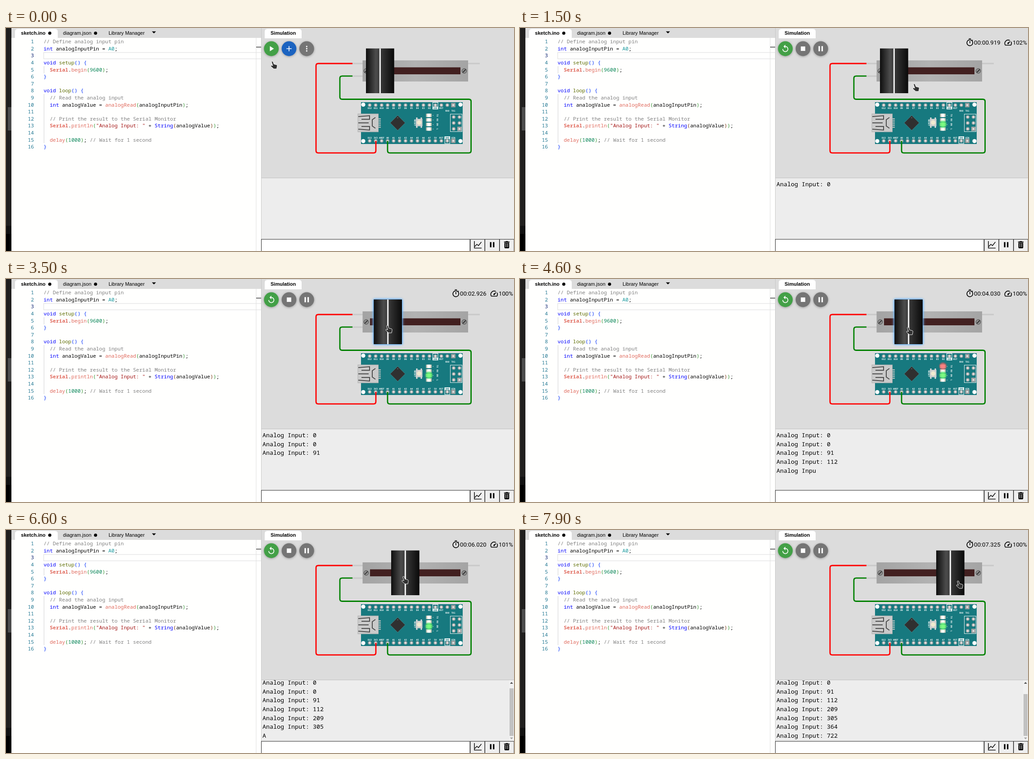
These frames come from a looping animation (1129 by 496 pixels, 8 s). An HTML page:

```html
<!DOCTYPE html>
<html lang="en">
<head>
<meta charset="utf-8">
<title>Slider simulation</title>
<style>
html, body { margin: 0; width: 100%; height: 100%; overflow: hidden; background: #dcdcdc; }
svg { display: block; }
text { white-space: pre; }
.tab { font: 11px "Liberation Sans", Arial, sans-serif; }
.code { font: 11.433px "Noto Sans Mono", monospace; }
.serial { font: 13.33px "Noto Sans Mono", monospace; }
.clock { font: 13.2px Roboto, sans-serif; }
.tip { font: 500 9.35px Roboto, sans-serif; fill: #fff; text-anchor: middle; }
.pin { font: bold 4.9px "DejaVu Sans Mono", monospace; fill: #fff; text-anchor: middle; }
.b { font-weight: bold; }
.c { fill: #808080; } .k { fill: #00f; } .f { fill: #5e6d03; } .a { fill: #e0695c; }
.s { fill: #a31515; } .n { fill: #098658; } .t { fill: #1a9a9f; }
.p1 { fill: #0431fa; } .p2 { fill: #319331; } .p3 { fill: #7b3814; }
.glow { filter: drop-shadow(0 0 2.5px #4fa8ff) drop-shadow(0 0 2px #8ccaff); }
.raised { filter: drop-shadow(0 1.5px 2.5px rgba(0, 0, 0, .32)); }
</style>
</head>
<body>
<svg id="stage" width="1129" height="496" viewBox="0 0 1129 496">
  <defs>
    <linearGradient id="knobFill">
      <stop offset="0" stop-color="#0e0e0e"/><stop offset=".35" stop-color="#4c4c4c"/>
      <stop offset=".5" stop-color="#3a3a3a"/><stop offset="1" stop-color="#0a0a0a"/>
    </linearGradient>
    <linearGradient id="bodyFill">
      <stop offset="0" stop-color="#a3a3a3"/><stop offset=".5" stop-color="#b2b2b2"/>
      <stop offset="1" stop-color="#a4a4a4"/>
    </linearGradient>
    <radialGradient id="greenLight">
      <stop offset="0" stop-color="#80ff80"/><stop offset=".55" stop-color="#60f070" stop-opacity=".85"/>
      <stop offset="1" stop-color="#40e060" stop-opacity="0"/>
    </radialGradient>
    <radialGradient id="redLight">
      <stop offset="0" stop-color="#ff8080"/><stop offset=".55" stop-color="#f06a6a" stop-opacity=".8"/>
      <stop offset="1" stop-color="#e04040" stop-opacity="0"/>
    </radialGradient>
    <clipPath id="serialClip"><rect x="568" y="334" width="550" height="136"/></clipPath>
  </defs>
</svg>
<script>
const stage = document.getElementById('stage');
const $ = id => document.getElementById(id);
const rect = (x, y, w, h, fill, more = '') =>
  `<rect x="${x}" y="${y}" width="${w}" height="${h}" fill="${fill}" ${more}/>`;
const circle = (x, y, r, fill, more = '') => `<circle cx="${x}" cy="${y}" r="${r}" fill="${fill}" ${more}/>`;
const line = (d, color, width, more = '') =>
  `<path d="${d}" fill="none" stroke="${color}" stroke-width="${width}" ${more}/>`;
const shape = (d, fill) => `<path d="${d}" fill="${fill}"/>`;
const text = (x, y, cls, s, more = '') => `<text x="${x}" y="${y}" class="${cls}" ${more}>${s}</text>`;
const group = (id, body) => `<g id="${id}">${body}</g>`;
const icon = (d, x, y, fill, k = .82) =>
  `<path transform="translate(${x} ${y}) scale(${k}) translate(-12 -12)" d="${d}" fill="${fill}"/>`;

const ICON = {
  play: 'M8 5v14l11-7z',
  add: 'M19 13h-6v6h-2v-6H5v-2h6V5h2v6h6z',
  more: 'M12 8a2 2 0 1 0 0-4 2 2 0 0 0 0 4zm0 2a2 2 0 1 0 0 4 2 2 0 0 0 0-4zm0 6a2 2 0 1 0 0 4 2 2 0 0 0 0-4z',
  replay: 'M12 5V1L7 6l5 5V7c3.31 0 6 2.69 6 6s-2.69 6-6 6-6-2.69-6-6H4c0 4.42 3.58 8 8 8s8-3.58 8-8-3.58-8-8-8z',
  stop: 'M6 6h12v12H6z',
  pause: 'M6 19h4V5H6zm8-14v14h4V5z',
  trash: 'M6 19a2 2 0 0 0 2 2h8a2 2 0 0 0 2-2V7H6zM19 4h-3.5l-1-1h-5l-1 1H5v2h14z',
  timer: 'M15 1H9v2h6zM11 14h2V8h-2zM19 7.4l1.4-1.4-1.4-1.4-1.4 1.4A9 9 0 1 0 19 7.4zM12 20a7 7 0 1 1 0-14 7 7 0 0 1 0 14z',
  speed: 'M20.4 8.6l-1.2 1.8a8 8 0 0 1-.3 7.6H5.1A8 8 0 0 1 15.6 6.9l1.8-1.3A10 10 0 0 0 3.4 19a2 2 0 0 0 1.7 1h13.8a2 2 0 0 0 1.8-1 10 10 0 0 0-.3-10.4zM10.6 15.4a2 2 0 0 0 2.8 0l5.7-8.5-8.5 5.7a2 2 0 0 0 0 2.8z'
};

// Each token is "class:text"; tokens are split by "|".
const CODE = [
  'c:// Define analog input pin',
  'k:int|: analogInputPin = |t:A0|:;',
  '',
  'k:void|: |f:setup|p1:()|: |p1:{',
  ':  |a b:Serial|:.|a:begin|p2:(|n:9600|p2:)|:;',
  'p1:}',
  '',
  'k:void|: |f:loop|p1:()|: |p1:{',
  'c:  // Read the analog input',
  'k:  int|: analogValue = |a:analogRead|p2:(|:analogInputPin|p2:)|:;',
  '',
  'c:  // Print the result to the Serial Monitor',
  'a b:  Serial|:.|a:println|p2:(|s:"Analog Input: "|: + |k:String|p3:(|:analogValue|p3:)|p2:)|:;',
  '',
  'a:  delay|p2:(|n:1000|p2:)|:; |c:// Wait for 1 second',
  'p1:}'
];

function codeLine(src, i) {
  const y = 34.2 + i * 15.6;
  const spans = src && src.split('|').map(tok => {
    const at = tok.indexOf(':');
    return `<tspan class="${tok.slice(0, at)}">${tok.slice(at + 1)}</tspan>`;
  }).join('');
  return text(62.2, y, 'code', i + 1, `text-anchor="end" fill="${i === 2 ? '#0b216f' : '#237893'}"`) +
    text(83.5, y, 'code', spans, 'xml:space="preserve"');
}

function editor() {
  return rect(0, 0, 12, 440, '#201f1e') + rect(4, 176, 8, 52, '#4c4c4c') +
    rect(0, 440, 12, 18, '#111') + rect(0, 458, 12, 38, '#000') +
    rect(12, 22, 555, 474, '#fffffe') +
    shape('M20 23V8q0-6 6-6H109q6 0 6 6V23z', '#fff') +
    text(33.3, 15, 'tab b', 'sketch.ino') + circle(97.3, 11.5, 3.5, '#000') +
    text(126.8, 15, 'tab', 'diagram.json') + circle(199, 11.5, 3.5, '#000') +
    text(228, 15, 'tab', 'Library Manager') + shape('M324.2 7.5h9.2l-4.6 4.6z', '#000') +
    line('M83.5 54.5H567M83.5 68.5H567M83.7 54V69', '#e6e6e6', 1.5) +
    line('M84.5 85V101M84.5 147V256', '#d3d3d3', 1) +
    line('M556 22V496', '#dedede', 1) + line('M556 42.5H567', '#424242', 1.6) +
    line('M567.5 0V496', '#c8c8c8', 1) + CODE.map(codeLine).join('');
}

function slider() {
  const screw = x => circle(x, 95.5, 5.3, '#8d8d8d', 'stroke="#444" stroke-width="1"') +
    line(`M${x - 3.5} 99L${x + 3.5} 92`, '#222', 1.6);
  return line('M769 79H793M769 107H793M1027 79H1053', '#c9c9c9', 3) +
    rect(792.5, 72, 234.5, 47, 'url(#bodyFill)') + rect(809, 87.5, 201, 15.5, '#422020') +
    screw(800.5) + screw(1018.5) +
    group('knob', rect(800, 45.5, 62.7, 99.5, 'url(#knobFill)') + rect(829.8, 45.5, 3.2, 99.5, '#ececec'));
}

function board() {
  const TEAL = '#17797f', px = i => 808.3 + i * 13.27;
  const pad = (x, y) => circle(x, y, 3.8, '#b9b9b9') + circle(x, y, 2, '#e6e6e6') +
    circle(x, y, 3, 'none', 'stroke="#8c8c8c" stroke-width=".7"');
  const ground = (x, y, labelY) => rect(x - 5.7, y - 6, 11.4, 12, 'none', 'stroke="#fff"') +
    rect(x - 6.2, labelY - 5, 12.4, 6, '#fff');
  const row = (names, y, labelY) => names.split(' ').map((name, i) => {
    const x = px(i), gnd = name === 'GND', low = /RX0|TX1/.test(name);
    return (gnd ? ground(x, y, labelY) : '') +
      (i === 14 ? rect(x - 4.8, y - 4.8, 9.6, 9.6, '#9b9b9b') : '') + pad(x, y) +
      text(x, labelY + (low ? 6 : 0), 'pin', name, gnd ? `style="fill:${TEAL}"` : '');
  }).join('');
  let s = rect(789, 165, 226, 93, TEAL);
  for (const x of [794, 1010]) for (const y of [170.5, 251.5]) s += circle(x, y, 4.6, '#fff');
  s += row('D12 D11 D10 D9 D8 D7 D6 D5 D4 D3 D2 GND RST RX0 TX1', 171.5, 180);
  s += row('D13 3V3 AREF A0 A1 A2 A3 A4 A5 A6 A7 5V RST GND VIN', 251, 246);
  // USB socket
  for (let i = 0; i < 5; i++) s += rect(827, 201 + i * 4.6, 6, 2.4, '#b8c0c0');
  s += rect(782, 191, 45.5, 40, '#cacaca', 'stroke="#b0b0b0" stroke-width="1"') +
    line('M783 197L808 195V203H790M783 211H806M790 219H808V227L783 225M821 199L814 204V218L821 223', '#4c4c4c', 2);
  // Processor
  s += '<g transform="translate(870.5 211) rotate(45)">' +
    rect(-11.7, -11.7, 23.4, 23.4, 'none', 'stroke="#75898a" stroke-width="1" stroke-dasharray="1 1"') +
    rect(-11.5, -11.5, 23, 23, '#303030') + circle(-8, -8, 1.2, '#666') + '</g>';
  // Reset button
  s += rect(911.5, 199, 3, 23, '#dedede') + rect(921.5, 199, 3, 23, '#dedede') +
    rect(911, 202, 14.5, 16.5, '#cfcfcf') + circle(918.2, 210.3, 5, '#f0ead0') +
    text(0, 0, 'pin', 'RESET', 'transform="translate(906.5 210.5) rotate(90)"');
  ['TX', 'RX', 'ON', 'L'].forEach((name, i) => {
    const y = 194.3 + i * 10.1;
    s += rect(933.5, y - 3.8, 12.5, 7.6, '#c9c9b8') + rect(936.3, y - 3.8, 7, 7.6, '#fff') +
      rect(948.5, y - .5, 1.3, 1.3, '#cfe3e4') +
      text(0, 0, 'pin', name, `transform="translate(956.5 ${y}) rotate(90)"`);
  });
  s += rect(987.5, 191.5, 26, 39, 'none', 'stroke="#e8f0f0" stroke-width="1"');
  for (let i = 0; i < 6; i++) {
    const x = 995 + i % 2 * 12.8, y = 198 + (i >> 1) * 13.2;
    if (i === 5) s += rect(x - 4.8, y - 4.8, 9.6, 9.6, '#a5a5a5');
    s += pad(x, y);
  }
  return s + group('power', circle(940, 214, 10, 'url(#greenLight)')) +
    group('tx', circle(940, 194, 10, 'url(#redLight)'));
}

function wires() {
  return line('M770 79H694q-5 0-5 5V272.8q0 5 5 5H817q5 0 5-5V251', '#f00', 2.8) +
    line('M770 106.8H747q-5 0-5 5V153.5q0 5 5 5H1028.6q5 0 5 5V272.8q0 5-5 5H853q-5 0-5-5V251', '#008000', 2.8);
}

function serialPanel() {
  const key = x => rect(x, 470, 32, 27, '#efefef', 'stroke="#222" stroke-width="1"');
  const rows = Array.from({ length: 8 }, (_, i) => text(570, 352 + i * ROW, 'serial', '', `id="row${i}"`)).join('');
  return rect(568, 334, 561, 162, '#ededed') + line('M568 333.5H1129', '#c0c0c0', 1) +
    `<g clip-path="url(#serialClip)">${group('rows', rows)}</g>` +
    group('scrollbar', rect(1118, 334, 11, 136, '#f1f1f1') + rect(1119, 346, 9, 112, '#c1c1c1', 'id="thumb"') +
      shape('M1120 342h7l-3.5-4z', '#505050') + shape('M1120 461.5h7l-3.5 4z', '#a3a3a3')) +
    rect(567.5, 470, 463.5, 27, '#fff', 'stroke="#222" stroke-width="1"') +
    key(1032) + key(1064.5) + key(1097) +
    line('M1041 474V489.5H1057M1042 486L1046.5 481L1050 484L1056.5 476', '#111', 1.6) +
    icon(ICON.pause, 1080.5, 482, '#000') + icon(ICON.trash, 1113, 482, '#000', .88) +
    line('M1111 479V487.5M1115 479V487.5', '#efefef', 1.2);
}

function toolbar() {
  const disc = (x, fill, id = '') => circle(x, 46, 16.4, fill, `class="raised" ${id}`);
  const button = (x, fill, name) => disc(x, fill) + icon(ICON[name], x, 46, '#fff');
  return shape('M575 23V8q0-6 6-6H651q6 0 6 6V23z', '#fff') +
    text(588, 15, 'tab b', 'Simulation') +
    disc(589.7, '#43a047', 'id="main"') +
    group('play', icon(ICON.play, 589.7, 46, '#fff')) +
    group('replay', icon(ICON.replay, 589.7, 46, '#fff')) +
    group('idle', button(629, '#1b63c0', 'add') + button(668.3, '#757575', 'more')) +
    group('busy', line('M613.5 37.5A17.5 17.5 0 0 1 621 30.5', '#111', 2)) +
    group('running', button(629, '#757575', 'stop') + button(668.3, '#757575', 'pause') +
      icon(ICON.timer, 999.8, 32, '#000') + text(1009, 37, 'clock', '', 'id="clock"') +
      icon(ICON.speed, 1084.8, 32.5, '#000') + text(1095, 37, 'clock', '', 'id="speed"'));
}

const ROW = 19.67;
const VALUES = [0, 0, 91, 112, 209, 305, 364, 722];
const HAND = 'M.6 1.8Q2 -.4 4 1.4L5.8 6.8L12 8.4Q13.6 9.200 13.200 11L12 17.4H5.600L-.6 12Q-1.8 9.8 .6 9.400L3.400 10.4Z';

stage.innerHTML += rect(12, 0, 1117, 496, '#dcdcdc') + editor() + toolbar() + slider() + board() + wires() +
  group('panel', serialPanel()) +
  group('tooltip', rect(0, 74, 0, 19.5, '#757575', 'rx="3" opacity=".85" id="tipBox"') +
    text(589.8, 86.6, 'tip', '', 'id="tipText"')) +
  `<path id="hand" d="${HAND}" fill="#303030" stroke="#fff" stroke-width=".9"/>`;

// Keys are [time, ...values]; linear between them.
function mix(keys, t) {
  const i = keys.findIndex(k => k[0] > t);
  if (i === 0) return keys[0].slice(1);
  if (i < 0) return keys[keys.length - 1].slice(1);
  const a = keys[i - 1], b = keys[i], u = (t - a[0]) / (b[0] - a[0]);
  return a.slice(1).map((v, j) => v + (b[j + 1] - v) * u);
}
const step = (keys, t) => keys.filter(k => k[0] <= t).pop()[1];

const KNOB = [[2200, 0], [2600, 14], [2900, 17.3], [3600, 17.3], [4600, 32.2], [5600, 47], [6600, 56], [7600, 111], [7900, 125]];
const POINTER = [[0, 589.5, 73.5], [300, 584.5, 51.5], [1000, 584.5, 51.5], [1500, 874, 123.5], [2100, 828, 102],
  [2600, 842, 102], [2900, 845, 102.5], [3600, 845, 102.5], [4600, 860, 106.5], [5600, 874, 106], [6600, 881, 102.5],
  [7600, 946, 112], [7900, 971, 112.5]];
const LAG = [[1500, 581], [3500, 574], [4600, 570], [6600, 580], [7900, 575]];
const SPEED = [[0, 97], [1200, 102], [2000, 101], [3000, 100], [5000, 101], [5800, 100], [6500, 101], [7400, 100]];

const show = (id, on) => { $(id).style.display = on ? '' : 'none'; };
const move = (id, x, y) => $(id).setAttribute('transform', `translate(${x} ${y})`);
const set = (id, attrs) => Object.entries(attrs).forEach(([k, v]) => $(id).setAttribute(k, v));
const digits = (n, len) => String(n).padStart(len, '0');

function draw(t) {
  const busy = t >= 500 && t < 700, running = t >= 700, hover = t >= 200 && t < 1100;
  const sim = t - mix(LAG, t)[0], ms = Math.max(0, Math.round(sim));

  show('play', !running);
  show('replay', running);
  show('idle', !running && !busy);
  show('busy', busy);
  show('running', running);
  show('power', running);
  show('panel', !busy);
  set('main', { fill: hover ? '#388e3c' : '#43a047' });

  show('tooltip', t >= 300 && hover);
  const width = running ? 106 : 94;
  set('tipBox', { x: 590 - width / 2, width });
  $('tipText').textContent = running ? 'Restart the simulation' : 'Start the simulation';
  $('clock').textContent = `00:${digits(Math.floor(ms / 1000), 2)}.${digits(ms % 1000, 3)}`;
  $('speed').textContent = step(SPEED, t) + '%';

  // The serial port sends roughly one character per millisecond.
  let count = 0, sending = false;
  VALUES.forEach((value, i) => {
    const full = 'Analog Input: ' + value;
    const sent = running ? Math.max(0, Math.ceil((sim - i * 1000.25 - 17.95) * .96)) : 0;
    if (sent) count++;
    if (sent > 1 && sent < full.length) sending = true;
    $('row' + i).textContent = full.slice(0, sent);
  });
  show('tx', sending);

  const shift = Math.max(0, count * ROW - 129.7), content = 136 + shift;
  move('rows', 0, -shift);
  show('scrollbar', shift > 0);
  set('thumb', { y: 346 + 112 * shift / content, height: 112 * 136 / content });

  move('knob', mix(KNOB, t)[0], 0);
  set('knob', { class: t >= 2200 && t < 6000 ? 'glow' : '' });
  move('hand', ...mix(POINTER, t));
}

const start = performance.now();
function tick() {
  const t = (performance.now() - start) % 8000;
  draw(Math.floor(t / 100) * 100);
  requestAnimationFrame(tick);
}
tick();
</script>
</body>
</html>
```
